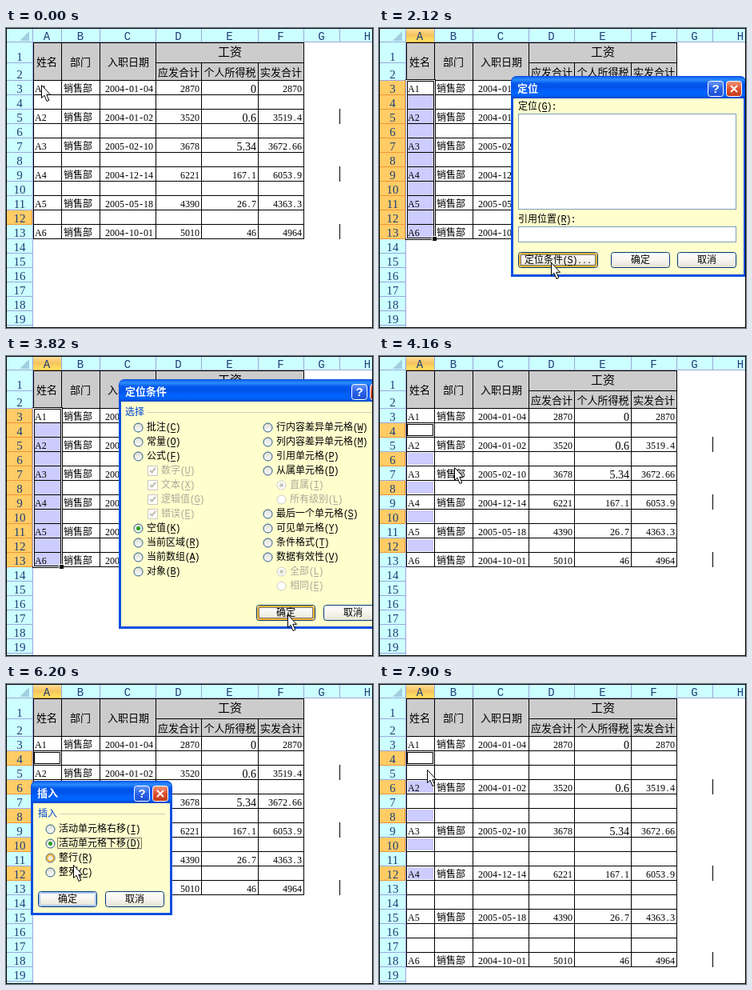
These frames come from a looping animation (459 px wide and 375 px high, 8 s). An HTML page with a canvas:

```html
<!DOCTYPE html>
<html lang="zh">
<head>
<meta charset="utf-8">
<title>工资表插入行</title>
<style>
html, body { margin: 0; width: 100%; height: 100%; overflow: hidden; background: #fff; }
canvas { display: block; }
</style>
</head>
<body>
<canvas id="stage" width="459" height="375"></canvas>
<script>
const ctx = document.getElementById('stage').getContext('2d');
const LOOP = 8000;
const CJK = '"Noto Sans CJK SC", "Noto Sans CJK", sans-serif';
const SANS = '"Liberation Sans", sans-serif';
const MONO = '"Liberation Mono", monospace';
const SERIF = '"Liberation Serif", serif';
const CREAM = '#ffffce', INK = '#1f3f77', GREY = '#aca899', RULE = '#9aa8dc';

// time, cursor x, cursor y
const POINTER = [
  [0, 44, 71], [100, 43, 70], [420, 42, 247], [760, 40, 256], [1100, 45, 248], [1440, 161, 167],
  [1780, 195, 255], [2120, 215, 293], [2460, 198, 198], [2800, 194, 202], [3140, 191, 219],
  [3480, 354, 322], [3820, 352, 323], [4160, 94, 139], [4500, 40, 132], [4840, 80, 168],
  [5180, 117, 252], [5520, 119, 217], [5860, 112, 222], [6200, 84, 226], [6540, 80, 218],
  [6880, 82, 232], [7220, 84, 262], [7560, 84, 254], [7900, 60, 107]
];

const COLS = [33, 69, 117, 187, 244, 315, 372, 417, 487];
const PAY = [
  ['2004-01-04', '2870', '0', '2870'],
  ['2004-01-02', '3520', '0.6', '3519.4'],
  ['2005-02-10', '3678', '5.34', '3672.66'],
  ['2004-12-14', '6221', '167.1', '6053.9'],
  ['2005-05-18', '4390', '26.7', '4363.3'],
  ['2004-10-01', '5010', '46', '4964']
];
const rowTop = r => r === 1 ? 18 : r === 2 ? 43 : 65 + (r - 3) * 18;

// ---------- drawing helpers ----------
function box(x, y, w, h, color) {
  ctx.fillStyle = color;
  ctx.fillRect(x, y, w, h);
}

function frame(x, y, w, h, color) {
  ctx.strokeStyle = color;
  ctx.lineWidth = 1;
  ctx.strokeRect(x + .5, y + .5, w - 1, h - 1);
}

function round(x, y, w, h, r, fill, stroke) {
  ctx.beginPath();
  ctx.roundRect(x + .5, y + .5, w - 1, h - 1, r);
  if (fill) { ctx.fillStyle = fill; ctx.fill(); }
  if (stroke) { ctx.strokeStyle = stroke; ctx.lineWidth = 1; ctx.stroke(); }
}

function shape(points, fill, stroke) {
  ctx.beginPath();
  points.forEach(([x, y]) => ctx.lineTo(x, y));
  ctx.closePath();
  if (fill) { ctx.fillStyle = fill; ctx.fill(); }
  if (stroke) { ctx.strokeStyle = stroke; ctx.lineWidth = 1; ctx.stroke(); }
}

function fade(y, h, ...stops) {
  const g = ctx.createLinearGradient(0, y, 0, y + h);
  stops.forEach((c, i) => g.addColorStop(i / (stops.length - 1), c));
  return g;
}

function text(s, x, y, size, family, color = '#000', align = 'left', weight = '') {
  ctx.font = `${weight} ${size}px ${family}`;
  ctx.textAlign = align;
  ctx.fillStyle = color;
  ctx.fillText(s, x, y + size * .36);
}

// Fixed pitch: ideographs take a full em, other characters 6 px.
const isHalf = c => c < '\u0100';
const songWidth = (s, size = 12) => [...s].reduce((w, c) => w + (isHalf(c) ? 6 : size), 0);

function song(s, x, y, { size = 12, color = '#000', align = 0 } = {}) {
  x -= songWidth(s, size) * align;
  let previous = '';
  for (const c of s) {
    const w = isHalf(c) ? 6 : size;
    const family = !isHalf(c) ? CJK : /[\d.]/.test(c) ? SERIF : MONO;
    text(c, x + w / 2, y, isHalf(c) ? 12 : size, family, color, 'center');
    if (previous === '(') box(x, y + 6, 6, 1, color);
    previous = c;
    x += w;
  }
}

function focusRing(x, y, w, h) {
  ctx.setLineDash([1, 1]);
  frame(x, y, w, h, '#000');
  ctx.setLineDash([]);
}

// ---------- worksheet ----------
function drawHeaders(active, hasColumn) {
  box(0, 0, 459, 17, '#ccffff');
  box(0, 0, 33, 375, '#ccffff');
  shape([[29, 4], [29, 16], [17, 16]], '#a4cfe0');
  if (hasColumn) box(34, 1, 35, 16, fade(1, 16, '#f9dc98', '#f5c45c', '#ffe664'));
  for (let r = 1; r <= 19; r++) {
    const y = rowTop(r), next = rowTop(r + 1);
    box(1, next, 32, 1, RULE);
    if (active.includes(r)) {
      box(1, y + 1, 32, next - y - 1, '#ffcc66');
      box(1, next, 32, 1, '#f29536');
      box(32, y, 1, next - y, '#f29536');
    }
    text(r, 17, next - 7.5, 15, SERIF, INK, 'center');
  }
  COLS.forEach(x => box(x, 1, 1, 16, RULE));
  box(0, 17, 459, 1, RULE);
  box(33, 1, 1, 374, RULE);
  if (hasColumn) box(34, 17, 35, 1, '#f29536');
  [...'ABCDEFGH'].forEach((c, i) =>
    text(c, (COLS[i] + COLS[i + 1]) / 2, 10, 14, MONO, INK, 'center'));
}

function drawTable(gap, selected, inset) {
  const last = 3 + gap * 5, bottom = rowTop(last + 1);
  box(34, 18, 339, 47, '#cccccc');
  selected.forEach(r =>
    box(35 + inset, rowTop(r) + 1 + inset, 34 - 2 * inset, 17 - 2 * inset, '#ccccff'));

  box(34, 18, 339, 1, '#000');
  box(187, 43, 186, 1, '#000');
  for (let r = 3; r <= last + 1; r++) box(34, rowTop(r), 339, 1, '#000');
  COLS.slice(0, 7).forEach((x, i) => {
    const y = i === 4 || i === 5 ? 43 : 18;
    box(Math.max(x, 34), y, 1, bottom - y, '#000');
  });

  const head = (s, x, y, size = 13) => song(s, x, y, { size, align: .5 });
  head('姓名', 51, 42);
  head('部门', 93, 42);
  head('入职日期', 153, 42);
  head('工资', 280, 30, 15);
  head('应发合计', 216, 55);
  head('个人所得税', 280, 55);
  head('实发合计', 344, 55);

  PAY.forEach(([date, gross, tax, net], i) => {
    const r = 3 + i * gap, y = rowTop(r) + 11;
    text('A' + (i + 1), 36, y, 12, SERIF);
    song('销售部', 72, y);
    song(date, 184, y, { align: 1 });
    song(gross, 242, y, { align: 1 });
    if (i < 3) text(tax, 313, y, 14, SERIF, '#000', 'right');
    else song(tax, 313, y, { align: 1 });
    song(net, 370, y, { align: 1 });
    if (i % 2) box(417, rowTop(r), 1, 19, '#000');
  });
}

// The thick selection border inverts the cell lines under it.
function drawSelection(from, to) {
  const y = rowTop(from), h = rowTop(to + 1) - y;
  ctx.strokeStyle = '#000';
  ctx.lineWidth = 3;
  ctx.strokeRect(34.5, y + .5, 35, h);
  frame(34, y, 36, h + 1, '#fff');
  box(33, y, 1, h, RULE);
  box(66, y + h - 3, 6, 6, '#fff');
  box(67, y + h - 2, 5, 5, '#000');
}

function drawSheet(t) {
  const scattered = t >= 4160;
  const column = Array.from({ length: 11 }, (_, i) => i + 3);
  const active = t < 100 ? [12] : t < 420 ? [3] : scattered ? [4, 6, 8, 10, 12] : column;
  box(0, 0, 459, 375, '#fff');
  drawHeaders(active, t >= 100);
  drawTable(t < 7560 ? 2 : 3, active.slice(1), scattered ? 1 : 0);
  if (scattered) frame(35, 85, 33, 15, '#000');
  else if (t >= 100) drawSelection(3, active.at(-1));
}

// ---------- dialogs ----------
function dialog(x, y, w, h, title) {
  ctx.beginPath();
  ctx.roundRect(x, y, w, h, [7, 7, 0, 0]);
  ctx.fillStyle = '#0a4fe0';
  ctx.fill();
  ctx.beginPath();
  ctx.roundRect(x + 1, y + 1, w - 2, 27, [6, 6, 0, 0]);
  ctx.fillStyle = fade(y, 28, '#0a58e8', '#2a8cff', '#0458ec', '#0052e8', '#0260fa', '#0064ff', '#0046c8');
  ctx.fill();
  box(x + 3, y + 28, w - 6, h - 31, CREAM);
  text(title, x + 8, y + 15, 13, CJK, '#fff', 'left', 'bold');

  const right = x + w, top = y + 6;
  round(right - 48, top, 20, 20, 3, fade(top, 20, '#6c9cf8', '#2a62e8', '#1c50d0'), '#fff');
  text('?', right - 38, top + 10, 15, SANS, '#fff', 'center', 'bold');
  round(right - 25, top, 20, 20, 3, fade(top, 20, '#f0a080', '#e05030', '#c03c18'), '#fff');
  ctx.strokeStyle = '#fff';
  ctx.lineWidth = 2;
  ctx.beginPath();
  for (const d of [-4, 4]) {
    ctx.moveTo(right - 15 - d, top + 6);
    ctx.lineTo(right - 15 + d, top + 14);
  }
  ctx.stroke();
}

function group(label, x, y, lineEnd) {
  song(label, x, y, { color: '#0046d5' });
  box(x + 27, y, lineEnd - x - 27, 1, '#d0d0bf');
}

function button(label, x, y, w, { ring, focus } = {}) {
  const color = { main: '#a6c4f4', hover: '#f8b636' }[ring];
  round(x, y, w, 20, 3, fade(y, 20, '#ffffff', '#f6f5ee', '#e4e0d4'), '#003c74');
  if (color) {
    round(x + 1, y + 1, w - 2, 18, 2, null, color);
    round(x + 2, y + 2, w - 4, 16, 1, null, color);
  }
  song(label, x + w / 2, y + 10, { align: .5 });
  if (focus) focusRing(x + 3, y + 3, w - 6, 14);
}

function radio(label, x, y, { on, state, disabled, focus } = {}) {
  const circle = (r, fill, stroke, lw = 1) => {
    ctx.beginPath();
    ctx.arc(x + .5, y + .5, r, 0, 7);
    if (fill) { ctx.fillStyle = fill; ctx.fill(); }
    if (stroke) { ctx.strokeStyle = stroke; ctx.lineWidth = lw; ctx.stroke(); }
  };
  const fill = disabled ? '#fff' : fade(y - 5, 11, state === 'pressed' ? '#b8b8a8' : '#dcdcd4', '#fff');
  circle(5.5, fill, disabled ? '#cac8bb' : '#1d5281');
  if (state === 'hover') circle(4, null, '#f8b636', 2);
  if (on) circle(2.5, disabled ? '#cac8bb' : '#21a121');
  song(label, x + 11, y, { color: disabled ? GREY : '#000' });
  if (focus) focusRing(x + 9, y - 7, songWidth(label) + 4, 14);
}

function checkbox(label, x, y) {
  box(x - 6, y - 6, 13, 13, '#fff');
  frame(x - 6, y - 6, 13, 13, '#cac8bb');
  ctx.strokeStyle = '#c0bdae';
  ctx.lineWidth = 2;
  ctx.beginPath();
  ctx.moveTo(x - 3, y);
  ctx.lineTo(x - .5, y + 2.5);
  ctx.lineTo(x + 4, y - 3);
  ctx.stroke();
  song(label, x + 11, y, { color: GREY });
}

function drawGoTo(t) {
  const hover = t >= 2120;
  dialog(165, 60, 294, 251, '定位');
  song('定位(G):', 174, 98);
  box(174, 107, 273, 120, '#fff');
  frame(174, 107, 273, 120, '#7f9db9');
  song('引用位置(R):', 174, 239);
  box(174, 248, 273, 20, '#fff');
  frame(174, 248, 273, 20, '#7f9db9');
  button('定位条件(S)...', 174, 280, 100, { ring: hover && 'hover', focus: hover });
  button('确定', 290, 280, 74, { ring: !hover && 'main' });
  button('取消', 373, 280, 74);
}

function drawGoToSpecial(t) {
  const left = ['批注(C)', '常量(O)', '公式(F)', '*数字(U)', '*文本(X)', '*逻辑值(G)', '*错误(E)',
    '空值(K)', '当前区域(R)', '当前数组(A)', '对象(B)'];
  const right = ['行内容差异单元格(W)', '列内容差异单元格(M)', '引用单元格(P)', '从属单元格(D)', '*直属(I)',
    '*所有级别(L)', '最后一个单元格(S)', '可见单元格(Y)', '条件格式(T)', '数据有效性(V)', '*全部(L)', '*相同(E)'];
  const chosen = t < 3480 ? 0 : 7;
  const focused = t < 3140 ? 0 : t < 3820 ? 7 : -1;

  dialog(141, 29, 339, 312, '定位条件');
  group('选择', 149, 70, 470);
  left.forEach((label, i) => {
    const y = 89 + i * 18;
    if (label[0] === '*') checkbox(label.slice(1), 183, y);
    else radio(label, 165, y, {
      on: i === chosen,
      focus: i === focused,
      state: i === 7 && t >= 3140 && t < 3480 && 'pressed'
    });
  });
  right.forEach((label, i) => {
    const disabled = label[0] === '*';
    radio(label.replace('*', ''), disabled ? 344 : 327, 89 + i * 18,
      { disabled, on: i === 4 || i === 10 });
  });
  button('确定', 313, 311, 74, { ring: t < 3480 ? 'main' : 'hover', focus: t >= 3820 });
  button('取消', 397, 311, 74);
}

function drawInsert(t) {
  const chosen = t < 6880 ? 1 : 2;
  dialog(31, 121, 177, 168, '插入');
  group('插入', 40, 162, 199);
  ['活动单元格右移(I)', '活动单元格下移(D)', '整行(R)', '整列(C)'].forEach((label, i) =>
    radio(label, 55, 181 + i * 18, {
      on: i === chosen,
      focus: i === chosen,
      state: i === 2 && t >= 6200 && t < 7220 && 'hover'
    }));
  button('确定', 40, 259, 74, { ring: t < 7220 ? 'main' : 'hover' });
  button('取消', 124, 259, 74);
}

// ---------- context menu ----------
function clipboard(x, y) {
  round(x - 7, y - 7, 11, 14, 1, '#e8c070', '#8a6a30');
  box(x - 4, y - 8, 5, 3, '#78879a');
  box(x - 2, y - 3, 9, 11, '#fff');
  frame(x - 2, y - 3, 9, 11, '#6f8cb4');
  for (let i = 0; i < 3; i++) box(x, y + i * 2.5, 5, 1, '#9db4d4');
}

function menuIcons() {
  ctx.strokeStyle = '#3f5f94';
  ctx.lineWidth = 1.5;
  ctx.beginPath();
  ctx.moveTo(52, 84); ctx.lineTo(57, 93);
  ctx.moveTo(59, 84); ctx.lineTo(54, 93);
  ctx.moveTo(55, 95); ctx.arc(53, 95, 2, 0, 7);
  ctx.moveTo(60, 95); ctx.arc(58, 95, 2, 0, 7);
  ctx.stroke();
  for (const [x, y] of [[48, 108], [53, 112]]) {
    box(x, y, 9, 11, '#eaf2fc');
    frame(x, y, 9, 11, '#5a7db0');
    box(x + 2, y + 4, 5, 1, '#7d9cc8');
    box(x + 2, y + 7, 5, 1, '#7d9cc8');
  }
  clipboard(55, 140);
  shape([[47, 349], [53, 349], [55, 351], [62, 351], [62, 362], [47, 362]], '#f0c040', '#5a4410');
  shape([[47, 346], [51, 346], [49, 351]], '#d04020');
}

function drawMenu(t) {
  const hover = t < 5180 ? 0 : t < 5520 ? 246 : 222;
  const items = [['工作表', 62, '>'], ['剪切(T)', 91], ['复制(C)', 115], ['粘贴选项:', 140, 'bold'],
    ['选择性粘贴(S)...', 192, 'off'], ['插入(I)...', 222], ['删除(D)...', 246], ['清除内容(N)', 272],
    ['筛选(E)', 301, '>'], ['排序(O)', 325, '>'], ['插入批注(M)', 354]];
  box(41, 47, 181, 330, '#fff');
  frame(41, 47, 181, 330, '#8f979f');
  box(42, 48, 27, 326, '#f3f6f8');
  box(69, 48, 1, 326, '#dde2e6');
  [77, 207, 286, 340, 369].forEach(y => box(72, y, 147, 1, '#d8dce0'));
  if (hover) {
    round(43, hover - 12, 177, 24, 2,
      fade(hover - 12, 24, '#fffae0', '#fff0b8', '#f9c28c', '#fad08c', '#ffe88c', '#fff6b8'), '#e0bc50');
  }
  round(71, 151, 24, 25, 2, '#fff', '#c4ccd4');
  clipboard(83, 163);
  menuIcons();
  items.forEach(([label, y, kind]) => {
    const color = kind === 'off' ? '#a0a0a0' : '#1e2a3a';
    text(label, 77, y, 12, CJK, color, 'left', kind === 'bold' ? 'bold' : '');
    const at = label.indexOf('(');
    if (at > 0) {
      const x = 77 + ctx.measureText(label.slice(0, at + 1)).width;
      box(x, y + 6, ctx.measureText(label[at + 1]).width, 1, color);
    }
    if (kind === '>') shape([[207, y - 4], [211, y], [207, y + 4]], '#44546a');
  });
}

function drawPointer(t) {
  const [, x, y] = POINTER.findLast(p => p[0] <= t);
  const outline = [[0, 0], [0, 16], [3.5, 12.7], [6.5, 20], [9.3, 18.8], [6.3, 11.8], [11, 11.8]];
  shape(outline.map(([dx, dy]) => [x + dx + .5, y + dy + .5]), '#fff', '#000');
}

function render(t) {
  drawSheet(t);
  if (t >= 1780 && t < 2460) drawGoTo(t);
  if (t >= 2460 && t < 4160) drawGoToSpecial(t);
  if (t >= 4840 && t < 6200) drawMenu(t);
  if (t >= 5860 && t < 7560) drawInsert(t);
  frame(0, 0, 459, 375, '#000');
  drawPointer(t);
}

const start = performance.now();
function tick() {
  render((performance.now() - start) % LOOP);
  requestAnimationFrame(tick);
}
tick();
</script>
</body>
</html>
```
